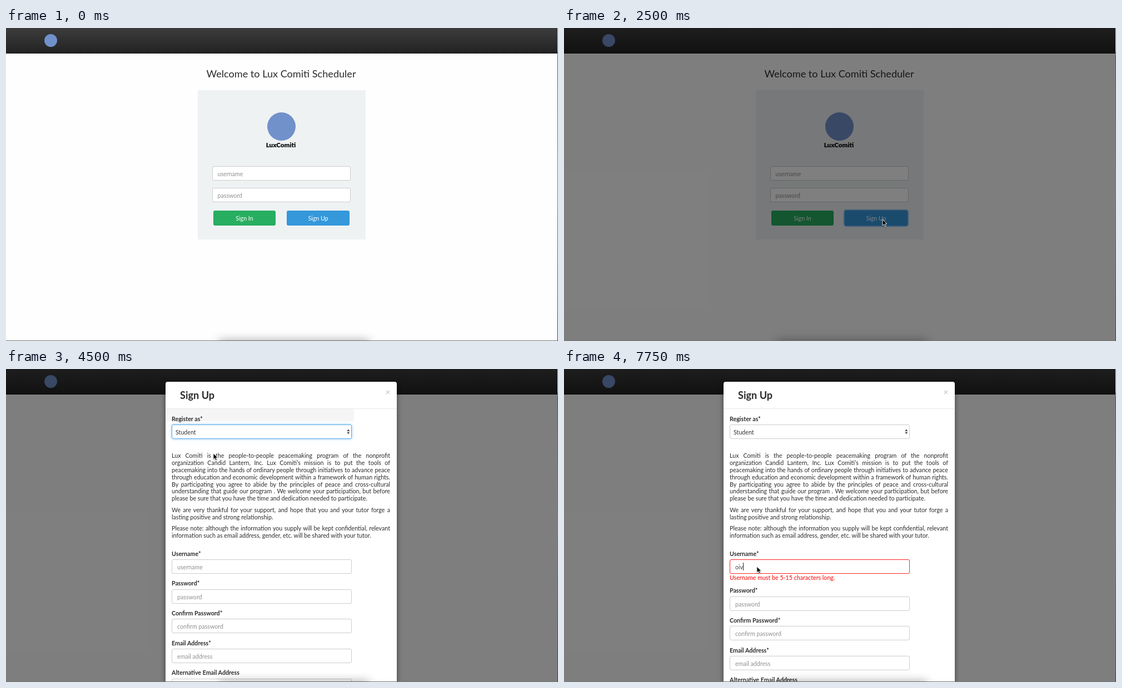
Write an HTML page that moves like this. It is 993 px wide and 564 px high and loops after 8 s.

```html
<!DOCTYPE html>
<html lang="en">
<head>
<meta charset="utf-8">
<title>Sign up</title>
<style>
html, body { margin: 0; width: 100%; height: 100%; overflow: hidden; background: #fefefe; }
#stage { position: relative; width: 993px; height: 564px; overflow: hidden; background: #fefefe;
  font: 10.68px/14px Lato, sans-serif; color: #2b2b2b; }
#stage div, #stage svg { position: absolute; box-sizing: border-box; }
.text { white-space: nowrap; }
.center { text-align: center; }
.justify { width: 393px; text-align: justify; text-align-last: justify; }
.label { font-weight: 700; }
.big { font-size: 18.1px; }
.bar { left: 0; top: 0; width: 993px; height: 45.5px; background: linear-gradient(#3c3c3c, #232323); border-bottom: 1px solid #161616; }
.logo { border-radius: 50%; background: #7191cb; }
.panel { left: 344.5px; top: 112px; width: 302px; height: 268.5px; background: #eff2f3; }
.wordmark { font-size: 11.6px; font-weight: 900; color: #000; }
.input { height: 26px; border: 1px solid #ccc; border-radius: 3px; background: #fff; color: #8f8f8f; padding: 6px 0 0 9px; white-space: nowrap; }
.button { top: 328.5px; height: 27px; border-radius: 3px; color: #fff; text-align: center; line-height: 27px; }
.signin { left: 373px; width: 112px; background: #27ae60; }
.signup { left: 505px; width: 113px; background: #3498db; }
.hover .signup { background: linear-gradient(#3498db 0 45%, #2f93cf 55%, #2a94ba 60%); }
.ring .signup { box-shadow: 0 0 0 1.5px #62aef2, 0 0 3px 1px #8cc4f5; }
.loginfocus #login, .focus #username, .selected #select {
  border-color: #5aa9e6; box-shadow: 0 0 5px rgba(102, 175, 233, .7); }
.fading #username, .fading #select { border-color: #96c4e6; box-shadow: 0 0 4px rgba(102, 175, 233, .3); }
#dim { inset: 0; background: rgba(0, 0, 0, .5); visibility: hidden; }
.dimmed #dim { visibility: visible; }
#modal { inset: 0; visibility: hidden; transform: translateY(-42.6px); }
.open #modal { visibility: visible; }
.settled #modal { transform: none; }
.sheet { left: 287px; top: 23px; width: 416px; height: 700px; background: #fff; border-radius: 4px; box-shadow: 0 3px 10px rgba(0, 0, 0, .5); }
.rule { left: 287px; top: 71px; width: 416px; height: 1px; background: #e8e8e8; }
.shade { left: 287px; top: 72px; width: 339px; height: 22px; background: #f5f5f5; visibility: hidden; }
.shaded .shade { visibility: visible; }
.menuopen .shade { height: 108px; background: linear-gradient(#f5f5f5 25%, #fdfdfd); }
.close { font-size: 15px; font-weight: 700; color: #ccc; }
#select { left: 298px; top: 99.5px; width: 324px; padding-left: 6px; color: #333; }
#rest { inset: 0; }
.error #rest { transform: translateY(12.8px); }
.error #username { border-color: #f22; box-shadow: none; color: #444; }
#message { color: #f00; visibility: hidden; }
.error #message { visibility: visible; }
#caret { top: 349px; width: 1px; height: 14px; background: #222; visibility: hidden; }
.caret #caret { visibility: visible; }
#menu { left: 290px; top: 102px; width: 325px; height: 64px; border-radius: 4px; background: #efefef; visibility: hidden;
  box-shadow: 0 0 0 .5px #aaa, 0 4px 10px rgba(0, 0, 0, .35); font: 10px/14.4px Inter, sans-serif; color: #222; }
.menuopen #menu { visibility: visible; }
#menu .item { left: 0; width: 325px; height: 14.4px; padding-left: 16px; }
#menu .item:first-child { background: #3b99fc; color: #fff; }
.dock { left: 383px; top: 564px; width: 270px; height: 40px; box-shadow: 0 0 18px rgba(0, 0, 0, .38), 0 -1px 1px rgba(0, 0, 0, .3); }
.edge { left: 992px; top: 0; width: 1px; height: 564px; background: linear-gradient(#d8dade 0 7%, #4b5266 9%, #6f7a92 50%, #353f5c); }
.foot { left: 0; top: 563px; width: 993px; height: 1px; background: #777; }
#pointer { left: -2px; top: -2px; visibility: hidden; filter: drop-shadow(0 1px 1px rgba(0, 0, 0, .35)); }
.pointing #pointer { visibility: visible; }
</style>
</head>
<body>
<div id="stage"></div>
<script>
const LOOP = 8000;
const stage = document.getElementById('stage');

const box = (cls, style = '', body = '', id = '') =>
  `<div class="${cls}"${id && ` id="${id}"`} style="${style}">${body}</div>`;
// Text is placed by its left edge and the middle of its line.
const text = (x, mid, body, cls = '', id = '') =>
  box('text ' + cls, `left:${x}px;top:${mid - 7}px`, body, id);
const centered = (x, mid, body, cls) =>
  box('text center ' + cls, `left:${x - 200}px;width:400px;top:${mid - 7}px`, body);
const input = (x, mid, width, body, id = '') =>
  box('input', `left:${x}px;top:${mid - 13}px;width:${width}px`, body, id);
const field = (mid, label, hint, id) =>
  text(298, mid - 23.2, label, 'label') + input(298, mid, 324, hint, id);
const circle = (x, y, size) =>
  box('logo', `left:${x - size / 2}px;top:${y - size / 2}px;width:${size}px;height:${size}px`);

const LINE = 12.83;
const paragraph = (mid, lines) => lines.map((line, i) =>
  text(298, mid + i * LINE, line, i < lines.length - 1 ? 'justify' : '')).join('');

const page =
  box('bar') + circle(80, 22.5, 23) +
  centered(495, 82, 'Welcome to Lux Comiti Scheduler', 'big') +
  box('panel') + circle(495.5, 177, 51) +
  centered(494.5, 211, 'LuxComiti', 'wordmark') +
  input(370.5, 262.3, 249.5, 'username', 'login') +
  input(370.5, 300.8, 249.5, 'password') +
  box('button signin', '', 'Sign In') + box('button signup', '', 'Sign Up');

const copy =
  paragraph(156.3, [
    'Lux Comiti is the people-to-people peacemaking program of the nonprofit',
    'organization Candid Lantern, Inc. Lux Comiti’s mission is to put the tools of',
    'peacemaking into the hands of ordinary people through initiatives to advance peace',
    'through education and economic development within a framework of human rights.',
    'By participating you agree to abide by the principles of peace and cross-cultural',
    'understanding that guide our program . We welcome your participation, but before',
    'please be sure that you have the time and dedication needed to participate.']) +
  paragraph(254, [
    'We are very thankful for your support, and hope that you and your tutor forge a',
    'lasting positive and strong relationship.']) +
  paragraph(287, [
    'Please note: although the information you supply will be kept confidential, relevant',
    'information such as email address, gender, etc. will be shared with your tutor.']);

const laterFields = [
  ['Password*', 'password'], ['Confirm Password*', 'confirm password'],
  ['Email Address*', 'email address'], ['Alternative Email Address', 'alternative email address'],
  ['First Name*', 'first name']
].map(([label, hint], i) => field(409.6 + i * 53.65, label, hint, '')).join('');

const arrows = `<svg style="left:613px;top:108px" width="6" height="10">
  <path d="M.3 4L2.8 .5L5.3 4ZM.3 5.8L2.8 9.3L5.3 5.8Z" fill="#444"/></svg>`;
const tick = `<svg style="left:4px;top:3px" width="9" height="9">
  <path d="M1 5L3 7.5L7 1" fill="none" stroke="#fff" stroke-width="1.5"/></svg>`;
const items = ['Student', 'Tutor', 'Administrator', 'Coordinator'].map((name, i) =>
  box('item', `top:${3.5 + i * 14.4}px`, (i ? '' : tick) + name)).join('');

const modal =
  box('sheet') + box('shade') + box('rule') +
  text(313, 47, 'Sign Up', 'big label') + text(682.5, 41, '×', 'close') +
  text(298, 89.7, 'Register as*', 'label') +
  box('input', '', '', 'select') + arrows + copy +
  field(356, 'Username*', '', 'username') + box('', '', '', 'caret') +
  text(298, 375.5, 'Username must be 5-15 characters long.', '', 'message') +
  box('', '', laterFields, 'rest') + box('', '', items, 'menu');

const pointer = `<svg id="pointer" width="14" height="19">
  <path transform="translate(2 2)" d="M0 0V11L2.6 8.7L4.4 12.7L6.3 11.9L4.6 8H8Z"
    fill="#000" stroke="#fff" stroke-width=".9"/></svg>`;

stage.innerHTML = page + box('', '', '', 'dim') + box('', '', modal, 'modal') +
  box('dock') + box('foot') + box('edge') + pointer;

const el = id => document.getElementById(id);
const parts = { pointer: el('pointer'), select: el('select'), username: el('username'), caret: el('caret') };

// Each state holds during its [from, to) spans.
const states = {
  pointing: [[500, LOOP]],
  loginfocus: [[1750, 2500]],
  hover: [[1750, 2500]],
  ring: [[2250, LOOP]],
  dimmed: [[2500, LOOP]],
  open: [[2750, LOOP]],
  settled: [[3000, LOOP]],
  menuopen: [[3500, 4250]],
  shaded: [[3500, 6500]],
  selected: [[4250, 5250]],
  fading: [[5250, 5500]],
  focus: [[5500, 6500]],
  error: [[6500, LOOP]],
  caret: [[5250, 6000], [6500, 7500], [7750, LOOP]]
};
const path = [
  [0, 632, 199], [750, 618, 242], [1000, 596, 292], [1250, 580, 329], [1500, 573, 345],
  [3000, 462, 205], [3250, 374, 114],
  [4500, 373, 152], [4750, 367, 235], [5000, 360, 320], [5250, 358, 345],
  [5750, 352, 351], [6000, 347, 356]
];
const typing = [[0, ''], [6500, 'o'], [6750, 'oi'], [7000, 'oiv']];
const choice = [[0, 'Sign Up As...'], [3500, 'Student']];

const at = (track, t) => track.filter(step => step[0] <= t).pop();
const setText = (node, value) => { if (node.textContent !== value) node.textContent = value; };

const pen = document.createElement('canvas').getContext('2d');
pen.font = '10.68px Lato, sans-serif';

function render(t) {
  for (const [name, spans] of Object.entries(states))
    stage.classList.toggle(name, spans.some(([from, to]) => t >= from && t < to));
  const [, x, y] = at(path, t);
  parts.pointer.style.transform = `translate(${x}px, ${y}px)`;
  const typed = at(typing, t)[1];
  setText(parts.username, typed || 'username');
  setText(parts.select, at(choice, t)[1]);
  parts.caret.style.left = Math.round(308 + pen.measureText(typed).width) + 'px';
}

const start = performance.now();
function tick_(now) {
  render(Math.max(0, now - start) % LOOP);
  requestAnimationFrame(tick_);
}
render(0);
requestAnimationFrame(tick_);
</script>
</body>
</html>
```
